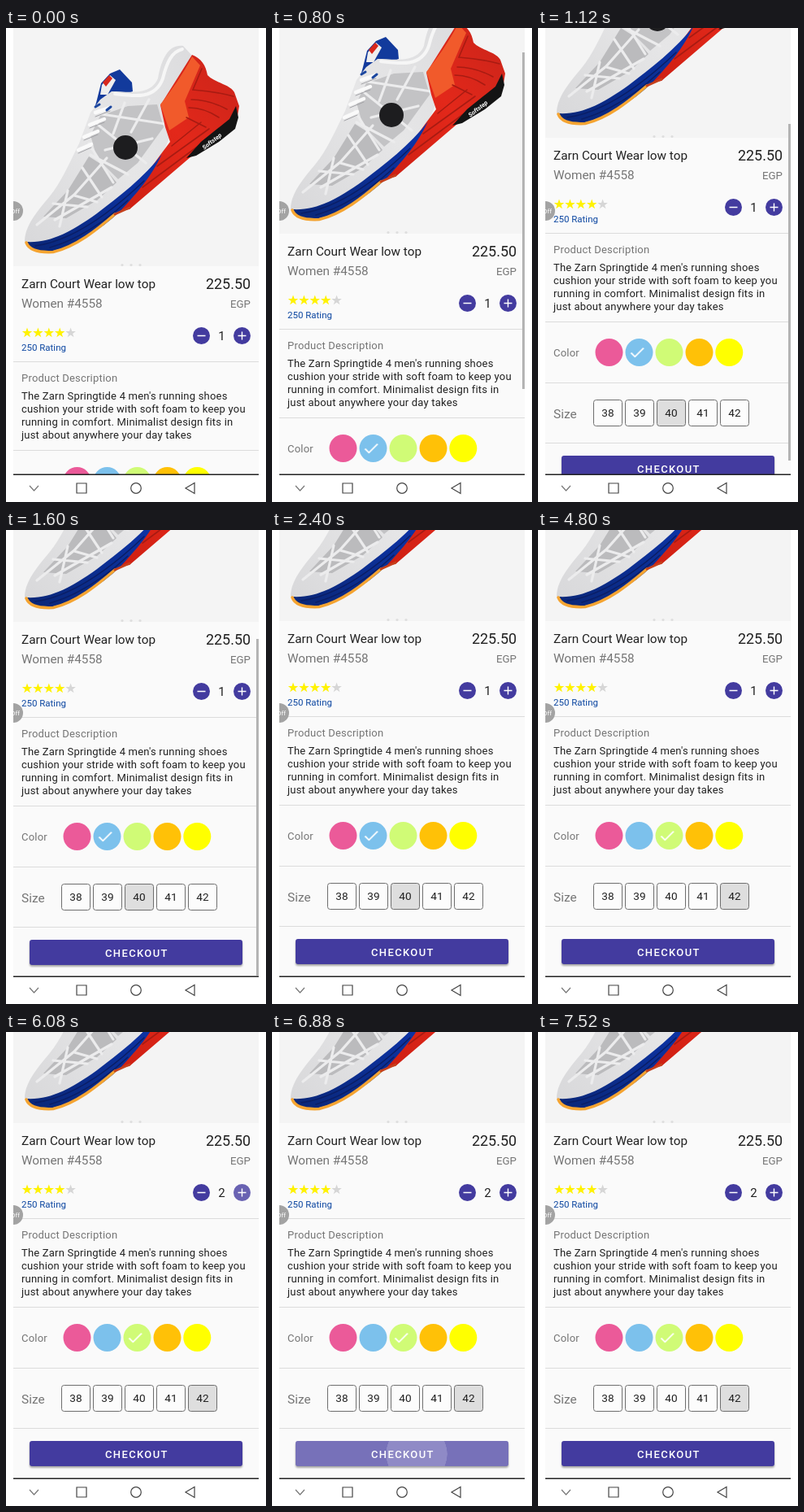
An HTML page that plays this animation: 320 px wide and 583 px high, repeating every 8.32 s.

```html
<!DOCTYPE html>
<html lang="en">
<head>
<meta charset="utf-8">
<title>Product page</title>
<style>
html, body { margin: 0; width: 100%; height: 100%; overflow: hidden; background: #fff; }
svg { display: block; width: 320px; height: 583px; }
text { font-family: Roboto, "Open Sans", sans-serif; fill: #212121; }
.line { stroke: #dcdcdc; }
.grey { fill: #757575; }
.body { font-size: 13px; letter-spacing: .2px; }
.big { font-size: 15.3px; }
.end { text-anchor: end; }
.mid { text-anchor: middle; }
.tick { fill: none; stroke: #fff; stroke-width: 1.8; }
.btn { fill: #433b9f; }
.box rect { fill: #fcfcfc; stroke: #6e6e6e; }
.box text { font-size: 13.6px; text-anchor: middle; }

#page, #bar, #s40, #s42, #tickA, #tickB, #one, #two, #tap, #press, #wave {
  animation: 8.32s step-end infinite;
}
#page { animation-name: scroll; }
@keyframes scroll {
  0% { transform: translateY(0); }
  9.61% { transform: translateY(-40px); }
  11.53% { transform: translateY(-108px); }
  13.46% { transform: translateY(-158px); }
  15.38% { transform: translateY(-172px); }
  17.3% { transform: translateY(-178px); }
  19.23% { transform: translateY(-180px); }
  21.15% { transform: translateY(-181px); }
}
#bar { animation-name: bar; }
@keyframes bar {
  0% { opacity: 0; transform: translateY(0); }
  9.61% { opacity: 1; transform: translateY(30px); }
  11.53% { opacity: 1; transform: translateY(81px); }
  13.46% { opacity: 1; transform: translateY(118px); }
  15.38% { opacity: 1; transform: translateY(129px); }
  17.3% { opacity: 1; transform: translateY(134px); }
  21.15% { opacity: 1; transform: translateY(136px); }
  23.07% { opacity: .75; transform: translateY(136px); }
  25% { opacity: .5; transform: translateY(136px); }
  26.92% { opacity: .25; transform: translateY(136px); }
  28.84% { opacity: 0; transform: translateY(136px); }
}
#s40 { animation-name: s40; }
@keyframes s40 { 0% { fill: #dedede; } 40.38% { fill: #fcfcfc; } }
#s42 { animation-name: s42; }
@keyframes s42 {
  0% { fill: #fcfcfc; }
  38.46% { fill: #ebebeb; }
  40.38% { fill: #cacaca; }
  42.3% { fill: #cfcfcf; }
  44.23% { fill: #d7d7d7; }
  46.15% { fill: #dedede; }
}
#tickA { animation-name: tickA; }
@keyframes tickA { 0% { opacity: 1; } 50% { opacity: .6; } 51.92% { opacity: 0; } }
#tickB { animation-name: tickB; }
@keyframes tickB {
  0% { opacity: 0; }
  51.92% { opacity: .5; }
  53.84% { opacity: 1; }
}
#one { animation-name: one; }
@keyframes one { 0% { opacity: 1; } 73.07% { opacity: 0; } }
#two { animation-name: two; }
@keyframes two { 0% { opacity: 0; } 73.07% { opacity: 1; } }
#tap { animation-name: tap; }
@keyframes tap {
  0% { opacity: 0; }
  71.15% { opacity: .24; }
  73.07% { opacity: .2; }
  75% { opacity: .1; }
  76.92% { opacity: 0; }
}
#press { animation-name: press; }
@keyframes press {
  0% { opacity: 0; }
  82.69% { opacity: .28; }
  84.61% { opacity: .26; }
  86.53% { opacity: .16; }
  88.46% { opacity: .07; }
  90.38% { opacity: 0; }
}
#wave { animation-name: wave; }
@keyframes wave {
  0% { opacity: 0; transform: scale(0); }
  82.69% { opacity: .18; transform: scale(37.5); }
  84.61% { opacity: .15; transform: scale(85); }
  86.53% { opacity: .09; transform: scale(155); }
  88.46% { opacity: .04; transform: scale(155); }
  90.38% { opacity: 0; transform: scale(0); }
}
</style>
</head>
<body>
<svg viewBox="0 0 320 583">
  <defs>
    <clipPath id="view"><rect x="9" width="302" height="549"/></clipPath>
    <clipPath id="pay"><rect x="29" y="684" width="262" height="31" rx="3"/></clipPath>
    <path id="star" d="M0-6.5 1.6-2 6.2-2 2.5.9 3.9 5.3 0 2.6-3.9 5.3-2.5.9-6.2-2-1.6-2Z"/>
    <path id="check" class="tick" d="M-10 .5l4.800 4.800 10.700-10.700"/>
    <filter id="soft" x="-5%" y="-20%" width="110%" height="160%"><feGaussianBlur stdDeviation="1.3"/></filter>
    <linearGradient id="upper" x1="0" y1="1" x2="1" y2="0">
      <stop offset="0" stop-color="#d8d8da"/><stop offset=".5" stop-color="#e6e6e7"/><stop offset="1" stop-color="#dcdcde"/>
    </linearGradient>
    <linearGradient id="heel" x1="0" y1="1" x2="1" y2="0">
      <stop offset="0" stop-color="#cc1f12"/><stop offset=".5" stop-color="#e3281a"/><stop offset="1" stop-color="#c9241a"/>
    </linearGradient>
    <linearGradient id="sole" x1="0" y1="1" x2="1" y2="0">
      <stop offset="0" stop-color="#0a2778"/><stop offset="1" stop-color="#0d35ac"/>
    </linearGradient>
  </defs>

  <g clip-path="url(#view)">
    <g id="page">
      <rect x="9" width="302" height="730" fill="#fafafa"/>
      <rect x="9" width="302" height="293" fill="#f4f4f4"/>

      <g id="shoe" fill="none" stroke-linecap="round">
        <path fill="#123a9c" d="M107 106 112 88 117 68 128 56 140 51 155 67 156 78 130 88Z"/>
        <path fill="#eee" d="M118 70 128 58 135 64 125 82 116 82Z"/>
        <path fill="#d8281c" d="M119 67 127 58 131 62 123 72Z"/>
        <path fill="url(#upper)" d="M23 262C23 245 36 228 53 208 68 190 78 166 90 142L104 104 116 88 130 78C150 78 178 84 187 62 192 34 202 20 218 22L230 35 194 94 204 128 184 176C140 204 96 246 46 268L27 267Z"/>
        <path fill="#bbbbbd" d="M46 232 76 200 102 158 118 168 136 190 112 212 74 234Z"/>
        <path fill="#c3c3c5" d="M104 132 116 108 150 96 186 94 194 122 162 166 138 186 112 160Z"/>
        <path stroke="#ececed" stroke-width="3.2" d="M38 242 84 205 124 160M76 200 66 244M84 206 112 214M94 172 118 208M58 216 100 220M104 156 150 180M112 118 172 166M118 106 196 118M146 92 132 130M176 88 154 128M102 142 132 190M60 236 130 196M122 150 180 136"/>
        <path stroke="#fafafa" stroke-width="4.500" d="M110 104 128 98M103 119 121 112M96 134 113 127M89 150 105 143"/>
        <path stroke="#a2a2a6" d="M110 109 128 102M103 123 121 116M96 138 113 131M89 154 105 147"/>
        <path stroke="#1c479f" stroke-width="3" d="M110 97 115 94M124 101 129 97"/>
        <path stroke="#f6f6f6" stroke-width="4" d="M134 81C158 84 184 88 193 62 198 42 204 29 217 26"/>
        <path fill="#1d1d1f" d="M132 147a15 15 0 1 0 30 0a15 15 0 1 0-30 0Z"/>
        <path fill="url(#heel)" d="M229 33C240 37 246 46 248 58 258 68 275 69 281 79L287 96 284 114 228 158 152 223 136 226C150 205 172 182 190 156L202 140 196 122 190 95Z"/>
        <path fill="#f15a2b" d="M229 35C217 58 204 76 190 94L201 126 225 110 220 90 239 46Z"/>
        <path stroke="#a81b12" stroke-width="1.6" d="M241 50 230 76Q258 78 280 84M228 88Q250 88 272 100M225 98Q244 98 262 110M222 110 246 122M204 145 240 116M186 170 250 124M168 196 238 144"/>
        <path fill="#141414" d="M222 160 240 140 275 112 283 96 286 110 282 124 262 140 234 157Z"/>
        <text transform="translate(244 150) rotate(-38)" style="font-size:7.500px;font-style:italic;font-weight:700;fill:#fff">Softstep</text>
        <path fill="url(#sole)" d="M25 263C56 265 84 248 112 228 138 208 170 184 192 155 178 184 162 202 140 226 112 252 80 270 54 275L32 273Z"/>
        <path stroke="#0a1e66" stroke-width="1.500" d="M36 268C80 262 126 230 170 188M54 270C88 260 122 238 150 212"/>
        <path stroke="#f5a431" stroke-width="3.500" d="M25 264Q30 277 58 275.500C86 269 112 248 134 229"/>
        <path stroke="#c5401c" stroke-width="3" d="M134 229 152 221"/>
      </g>

      <g fill="#dedede">
        <circle cx="143" cy="291.5" r="1.6"/><circle cx="154" cy="291.5" r="1.6"/><circle cx="165" cy="291.5" r="1.6"/>
      </g>

      <text class="big" x="19" y="320">Zarn Court Wear low top</text>
      <text class="end" x="301" y="321" font-size="17.9">225.50</text>
      <text class="big grey" x="19" y="343.5">Women #4558</text>
      <text class="end grey" x="301" y="344" font-size="13.3">EGP</text>

      <g fill="#fff200">
        <use href="#star" x="26" y="375"/><use href="#star" x="39.4" y="375"/><use href="#star" x="52.8" y="375"/><use href="#star" x="66.2" y="375"/>
        <use href="#star" x="79.6" y="375" fill="#d6d6d6"/>
      </g>
      <text x="19" y="397" style="font-size:11.5px;fill:#0d47a1">250 Rating</text>

      <circle class="btn" cx="240.5" cy="378.5" r="10.5"/>
      <circle class="btn" cx="290.5" cy="378.5" r="10.5"/>
      <circle id="tap" cx="290.5" cy="378.5" r="10.5" fill="#fff"/>
      <path stroke="#fff" stroke-width="1.4" d="M235.5 378.5h10M285.5 378.5h10M290.5 373.5v10"/>
      <text id="one" class="mid" x="265.5" y="384" font-size="15">1</text>
      <text id="two" class="mid" x="265.5" y="384" font-size="15">2</text>

      <path class="line" d="M9 410.5h302M9 519.5h302M9 594.5h302M9 668.5h302"/>

      <text class="body grey" x="19" y="435">Product Description</text>
      <text class="body">
        <tspan x="19" y="457">The Zarn Springtide 4 men's running shoes</tspan>
        <tspan x="19" y="473">cushion your stride with soft foam to keep you</tspan>
        <tspan x="19" y="489">running in comfort. Minimalist design fits in</tspan>
        <tspan x="19" y="504.5">just about anywhere your day takes</tspan>
      </text>

      <text class="body grey" x="19" y="562">Color</text>
      <circle cx="87.5" cy="557" r="17" fill="#eb5a99"/>
      <circle cx="124.5" cy="557" r="17" fill="#7cc1ec"/>
      <circle cx="161.5" cy="557" r="17" fill="#d0fb76"/>
      <circle cx="198.5" cy="557" r="17" fill="#ffc107"/>
      <circle cx="235.3" cy="557" r="17" fill="#ffff00"/>
      <use id="tickA" href="#check" x="124.5" y="557"/>
      <use id="tickB" href="#check" x="161.5" y="557"/>

      <text class="grey" x="19" y="637.5" font-size="15.4">Size</text>
      <g class="box">
        <rect x="68.5" y="615.5" width="35" height="32" rx="3"/><text x="86" y="636">38</text>
        <rect x="107.5" y="615.5" width="35" height="32" rx="3"/><text x="125" y="636">39</text>
        <rect id="s40" x="146.5" y="615.5" width="35" height="32" rx="3"/><text x="164" y="636">40</text>
        <rect x="185.5" y="615.5" width="35" height="32" rx="3"/><text x="203" y="636">41</text>
        <rect id="s42" x="224.5" y="615.5" width="35" height="32" rx="3"/><text x="242" y="636">42</text>
      </g>

      <rect x="29" y="686" width="262" height="31" rx="3" fill="#000" opacity=".35" filter="url(#soft)"/>
      <g clip-path="url(#pay)">
        <rect class="btn" x="29" y="684" width="262" height="31"/>
        <rect id="press" x="29" y="684" width="262" height="31" fill="#fff"/>
        <g transform="translate(178 700)"><circle id="wave" r="1" fill="#fff"/></g>
      </g>
      <text x="122" y="704.5" style="font-size:13px;font-weight:500;letter-spacing:1.35px;fill:#fff">CHECKOUT</text>
    </g>

    <rect id="bar" x="308" width="3" height="414" fill="#b4b4b4"/>
    <circle cx="9" cy="225" r="12" fill="#a3a3a3"/>
    <text x="6" y="227.5" style="font-size:8px;fill:#fff">Off</text>
  </g>

  <rect x="9" y="548.5" width="302" height="1.5" fill="#222"/>
  <g fill="none" stroke="#444" stroke-width="1.2">
    <path stroke="#777" d="M29 563l5.5 6 5.5-6"/>
    <path d="M87 560h12v12h-12ZM232 559.5 221 566l11 6.5Z"/>
    <circle cx="160" cy="566" r="6.3"/>
  </g>
</svg>
</body>
</html>
```
